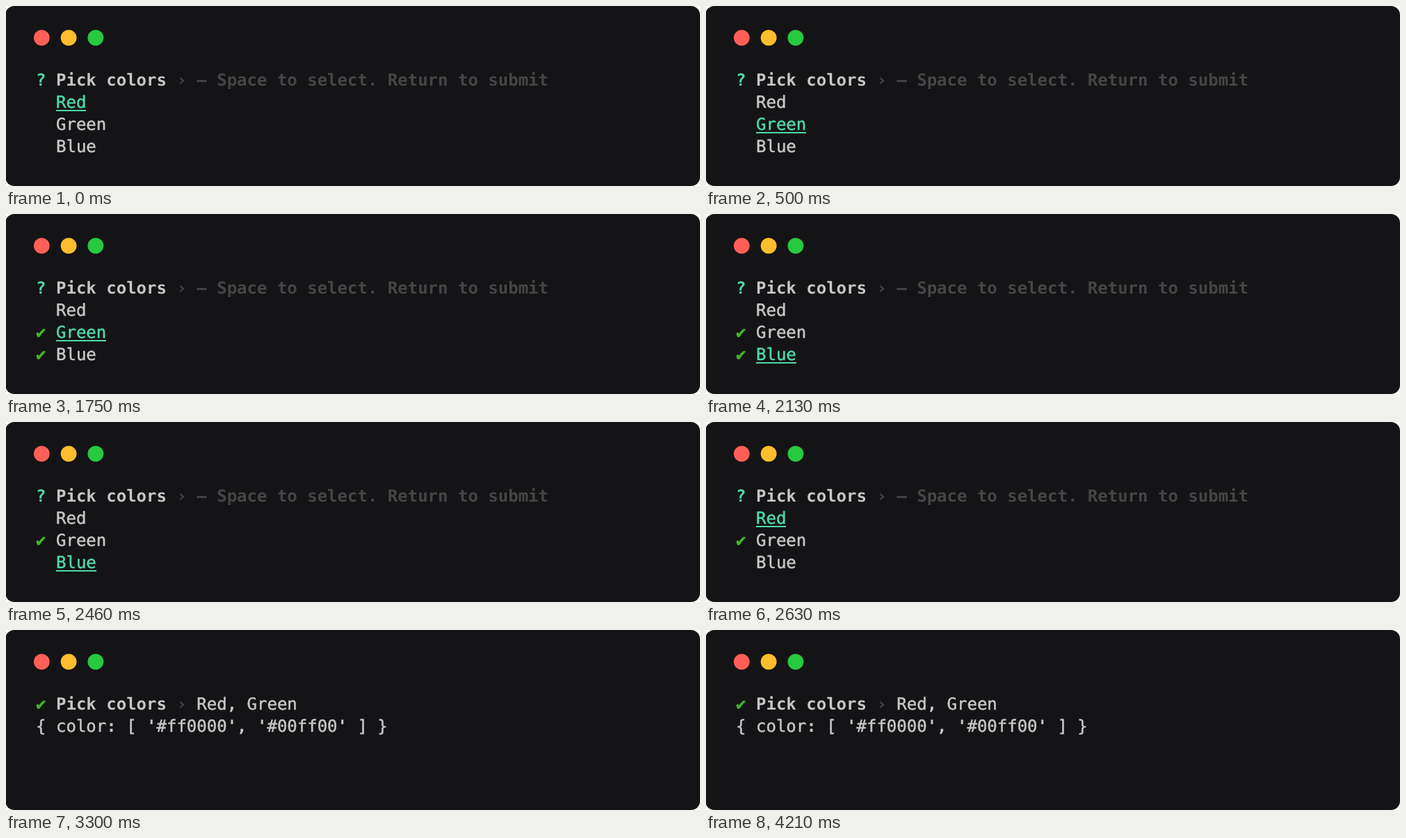
These frames come from a looping animation (998x260 px, 4.5 s). An HTML page with a canvas:

```html
<!DOCTYPE html>
<html lang="en">
<head>
<meta charset="utf-8">
<title>Pick colors</title>
<style>
  html, body { margin: 0; width: 100%; height: 100%; overflow: hidden; background: #fff; }
  canvas { display: block; }
</style>
</head>
<body>
<canvas id="stage" width="998" height="260"></canvas>
<script>
const ctx = document.getElementById('stage').getContext('2d');
const LOOP = 4500;
const FONT = '24px "DejaVu Sans Mono", monospace';
const CELL = 14.449;
const LEFT = 43.1;
const COLOR = {
  panel: '#141416', text: '#c7c7c7', dim: '#454546', accent: '#50d8a8', check: '#42b72a'
};
const ITEMS = ['Red', 'Green', 'Blue'];

// Key presses: time in ms and action.
const KEYS = [
  [400, 'down'], [750, 'down'], [1090, 'space'],
  [1420, 'up'], [1750, 'space'],
  [2130, 'down'], [2340, 'space'],
  [2500, 'up'], [2630, 'up'], [2970, 'space'],
  [3300, 'enter']
];

function stateAt(time) {
  const state = { cursor: 0, picked: [false, false, false], done: false };
  for (const [at, key] of KEYS) {
    if (time < at) break;
    if (key === 'down') state.cursor++;
    else if (key === 'up') state.cursor--;
    else if (key === 'space') state.picked[state.cursor] = !state.picked[state.cursor];
    else state.done = true;
  }
  return state;
}

const baseline = row => 115 + 32 * row;

// Each character sits in its own terminal cell; a thin outline thickens regular text.
function write(str, col, row, color, bold = false) {
  ctx.textRendering = 'geometricPrecision';
  ctx.fillStyle = ctx.strokeStyle = color;
  ctx.lineWidth = 0.5;
  ctx.lineJoin = 'round';
  [...str].forEach((ch, i) => {
    const heavy = bold || /[,:']/.test(ch);
    const x = LEFT + (col + i) * CELL;
    ctx.font = (heavy ? 'bold ' : '') + FONT;
    ctx.fillText(ch, x, baseline(row));
    if (!heavy) ctx.strokeText(ch, x, baseline(row));
  });
}

function drawWindow() {
  ctx.clearRect(0, 0, 998, 260);
  ctx.fillStyle = COLOR.panel;
  ctx.beginPath();
  ctx.roundRect(-1, 0, 999, 260, 13);
  ctx.fill();
  ['#ff5f56', '#ffbd2e', '#27c93f'].forEach((color, i) => {
    ctx.fillStyle = color;
    ctx.beginPath();
    ctx.arc(51.3 + 38.8 * i, 45.9, 11.4, 0, Math.PI * 2);
    ctx.fill();
  });
}

function drawMenu({ cursor, picked }) {
  write('?', 0, 0, COLOR.accent, true);
  write('– Space to select. Return to submit', 16, 0, COLOR.dim, true);
  ITEMS.forEach((name, i) => {
    const row = i + 1;
    const active = i === cursor;
    if (picked[i]) write('✔', 0, row, COLOR.check);
    write(name, 2, row, active ? COLOR.accent : COLOR.text);
    if (active) ctx.fillRect(72, baseline(row) + 3, Math.round(name.length * CELL), 2);
  });
}

function drawResult({ picked }) {
  write('✔', 0, 0, COLOR.check);
  write(ITEMS.filter((_, i) => picked[i]).join(', '), 16, 0, COLOR.text);
  write("{ color: [ '#ff0000', '#00ff00' ] }", 0, 1, COLOR.text);
}

function render(time) {
  const state = stateAt(time);
  drawWindow();
  write('Pick colors', 2, 0, COLOR.text, true);
  write('›', 14, 0, COLOR.dim, true);
  (state.done ? drawResult : drawMenu)(state);
}

const start = performance.now();
function tick() {
  render((performance.now() - start) % LOOP);
  requestAnimationFrame(tick);
}
tick();
</script>
</body>
</html>
```
